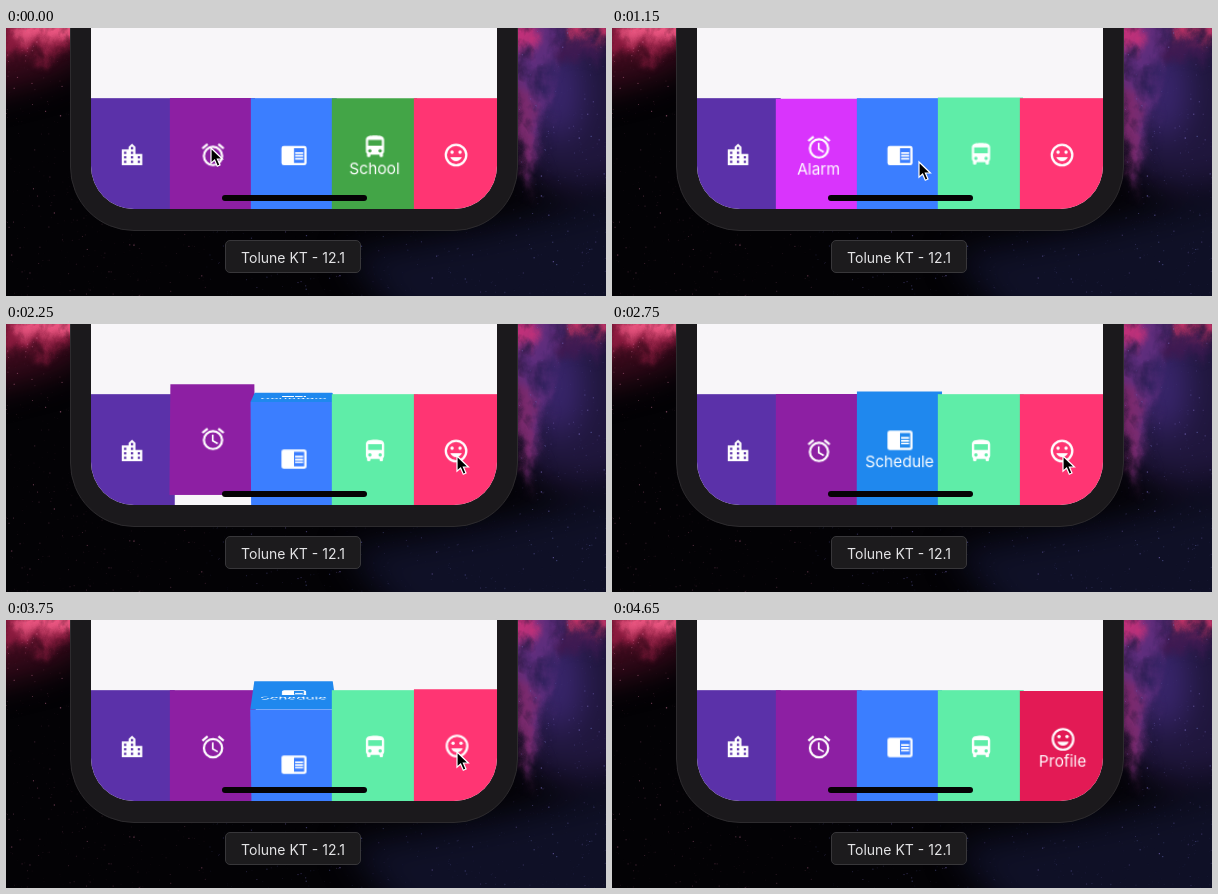
An HTML page with a canvas that plays this animation: 600x268 px, repeating every 4.7 s.

```html
<!DOCTYPE html>
<html lang="en">
<head>
<meta charset="utf-8">
<title>Flip box bar</title>
<style>
  html, body { margin: 0; width: 100%; height: 100%; overflow: hidden; background: #030305; }
  #stage { position: relative; width: 600px; height: 268px; overflow: hidden; font-family: Inter, "Open Sans", sans-serif; }
  #sky, #stars { position: absolute; left: 0; top: 0; }
  #phone {
    position: absolute; left: 64px; top: -200px; width: 446px; height: 401px;
    background: #1b191c; border: 1px solid #2d2b2e; border-radius: 0 0 64px 64px; box-sizing: content-box;
  }
  #screen {
    position: absolute; left: 85px; top: -100px; width: 405.75px; height: 281.2px;
    overflow: hidden; background: #f8f6f9; border-radius: 0 0 43px 43px;
  }
  .item { position: absolute; top: 172.7px; width: 81.15px; height: 108.3px; perspective: 1083px; }
  .cube, .face { position: absolute; inset: 0; }
  .cube { transform-style: preserve-3d; }
  .face { backface-visibility: hidden; color: #fff; }
  .front { transform: translateZ(54.15px); }
  .top { transform: rotateX(90deg) translateZ(54.15px); }
  .face svg { position: absolute; left: 27.6px; top: 41.2px; width: 26px; height: 26px; fill: #fff; }
  .top svg { top: 32.6px; }
  .face span {
    position: absolute; left: -10px; right: -10px; top: 57.4px; line-height: 20px;
    text-align: center; font-size: 14.8px; white-space: nowrap;
  }
  #home { position: absolute; left: 216px; top: 167px; width: 145px; height: 5.5px; border-radius: 3px; background: #050305; }
  #device {
    position: absolute; left: 219px; top: 212px; width: 134px; height: 31px; line-height: 33px;
    border: 1px solid #38373a; border-radius: 5px; background: #1c1b1d;
    color: #e4e4e6; font-size: 14px; text-align: center; white-space: nowrap;
  }
  #cursor { position: absolute; left: -2px; top: -2px; width: 16px; height: 23px; }
</style>
</head>
<body>
<div id="stage">
  <svg id="sky" width="600" height="268">
    <defs>
      <filter id="cloud" filterUnits="userSpaceOnUse" x="-40" y="-40" width="680" height="348" color-interpolation-filters="sRGB">
        <feGaussianBlur stdDeviation="6" result="soft"/>
        <feTurbulence type="fractalNoise" baseFrequency=".04 .03" numOctaves="5" seed="8" result="noise"/>
        <feDisplacementMap in="soft" in2="noise" scale="30" xChannelSelector="R" yChannelSelector="G" result="torn"/>
        <feColorMatrix in="noise" values="0 0 0 0 0  0 0 0 0 0  0 0 0 0 0  0 0 0 2.6 -.45"/>
        <feComposite in="torn" operator="in"/>
      </filter>
      <filter id="haze" filterUnits="userSpaceOnUse" x="-80" y="-80" width="760" height="428" color-interpolation-filters="sRGB">
        <feGaussianBlur stdDeviation="16"/>
      </filter>
    </defs>
    <rect width="600" height="268" fill="#030205"/>
    <g filter="url(#haze)">
      <path d="M-40-40H80V30L40 50-40 70Z" fill="#3a0a1c"/>
      <path d="M500-40H640V150L570 165 520 150Z" fill="#1f163c"/>
      <path d="M340 225 480 200 640 160V300H400Z" fill="#0f1026"/>
      <ellipse cx="552" cy="62" rx="24" ry="50" fill="#3a266e"/>
    </g>
    <g filter="url(#cloud)">
      <path d="M-30-30H75V18L50 28 20 26-30 40Z" fill="#8a1a3e"/>
      <path d="M4-25H68V6L46 16 18 12Z" fill="#ea5580"/>
      <path d="M495-30H556L550 40 540 92 530 165 522 150 505 80Z" fill="#5d2d7c"/>
      <path d="M500 40 522 60 530 110 529 165 521 150 505 90Z" fill="#7c2a6e"/>
      <path d="M495-30H535L528 14 512 34Z" fill="#c23079"/>
      <path d="M548-30H620V12L590 10 565 4Z" fill="#cc3569"/>
      <path d="M545 5 600 14 592 28 552 34Z" fill="#3f1a52"/>
    </g>
  </svg>
  <canvas id="stars" width="600" height="268"></canvas>
  <div id="phone"></div>
  <div id="screen"></div>
  <div id="home"></div>
  <div id="device">Tolune KT - 12.1</div>
  <svg id="cursor" viewBox="-2 -2 16 23">
    <path d="M0 0V15.2L3.6 12 6.3 18.2 9 17 6.4 11H11.4Z" fill="#000" stroke="#fff" stroke-width="1.2"/>
  </svg>
</div>
<script>
const LOOP = 4700, FLIP = 2080, PITCH = 81.15;
const ALARM = -510, SCHEDULE = 1295, PROFILE = 3012;

const holes = (x, ys) => ys.map(y => `M${x} ${y}h2v2h-2z`).join('');
const path = d => `<path fill-rule="evenodd" d="${d}"/>`;
const line = (d, w) => `<path fill="none" stroke="#fff" stroke-width="${w}" d="${d}"/>`;
const ring = (cy, r) => `<circle cx="12" cy="${cy}" r="${r}" fill="none" stroke="#fff" stroke-width="2"/>`;
const dot = (x, y) => `<circle cx="${x}" cy="${y}" r="1.5"/>`;

const icons = {
  city: path('M15 11V5l-3-3-3 3v2H3v14h18V11z' +
    holes(5, [9, 13, 17]) + holes(11, [5, 9, 13, 17]) + holes(17, [13, 17])),
  alarm: ring(13, 8) + line('M2.65 6.5 7.25 2.6M16.75 2.6l4.6 3.9', 2) + line('M11.75 8v5.6l4.4 2.6', 1.5),
  reader: path('M13 12h7v1.5h-7zm0-2.5h7V11h-7zm0 5h7V16h-7zM21 4H3a2 2 0 0 0-2 2v13a2 2 0 0 0 2 2h18a2 2 0 0 0 2-2V6a2 2 0 0 0-2-2zm0 15h-9V6h9z'),
  bus: path('M4 16a3 3 0 0 0 1 2.2V20a1 1 0 0 0 1 1h1a1 1 0 0 0 1-1v-1h8v1a1 1 0 0 0 1 1h1a1 1 0 0 0 1-1v-1.8a3 3 0 0 0 1-2.2V6c0-3.5-3.6-4-8-4s-8 .5-8 4z' +
    'M6 6h12v5H6zM6 15.5a1.5 1.5 0 0 0 3 0 1.5 1.5 0 0 0-3 0zM15 15.5a1.5 1.5 0 0 0 3 0 1.5 1.5 0 0 0-3 0z'),
  smile: ring(12, 9) + dot(8.5, 9.5) + dot(15.5, 9.5) + path('M12 17.5c2.3 0 4.3-1.5 5.1-3.5H6.9c.8 2 2.8 3.5 5.1 3.5z')
};

// on / off: when the box starts turning to its labelled face and back
const items = [
  { icon: 'city', label: 'Home', front: '#5b31a9', top: '#5b31a9', on: Infinity, off: Infinity },
  { icon: 'alarm', label: 'Alarm', front: '#8d1fa3', top: '#d934fc', on: ALARM, off: SCHEDULE },
  { icon: 'reader', label: 'Schedule', front: '#3b7eff', top: '#1f88ee', on: SCHEDULE, off: PROFILE },
  { icon: 'bus', label: 'School', front: '#5feda8', top: '#43a547', on: -LOOP, off: ALARM },
  { icon: 'smile', label: 'Profile', front: '#ff3573', top: '#e31a55', on: PROFILE, off: Infinity }
];

const screen = document.getElementById('screen');
items.forEach((item, i) => {
  const svg = `<svg viewBox="0 0 24 24">${icons[item.icon]}</svg>`;
  const box = document.createElement('div');
  box.className = 'item';
  box.style.left = i * PITCH + 'px';
  box.innerHTML = `<div class="cube">
    <div class="face front" style="background:${item.front}">${svg}</div>
    <div class="face top" style="background:${item.top}">${svg}<span>${item.label}</span></div></div>`;
  screen.append(box);
  item.cube = box.firstChild;
});

// Faint red dust on the left, blue stars on the right
function drawStars() {
  const ctx = document.getElementById('stars').getContext('2d');
  let seed = 11;
  const rnd = () => (seed = (seed * 16807) % 2147483647) / 2147483647;
  for (let i = 0; i < 2200; i++) {
    const x = rnd() * 600, y = rnd() * 268, size = .6 + rnd() * .7;
    const hue = x < 200 ? 335 : 232 + rnd() * 25;
    ctx.fillStyle = `hsla(${hue}, 45%, 62%, ${.05 + .6 * rnd() ** 5})`;
    ctx.fillRect(x, y, size, size);
  }
}

const clamp = x => Math.min(1, Math.max(0, x));

function elasticInOut(x) {
  if (x <= 0 || x >= 1) return clamp(x);
  const u = 2 * x - 1;
  const wave = .5 * 2 ** (-10 * Math.abs(u)) * Math.sin((u - .1) * 5 * Math.PI);
  return u < 0 ? -wave : 1 + wave;
}

// A box turned back early starts from where it had got to
function progress({ on, off }, t) {
  const p = clamp((Math.min(t, off) - on) / FLIP);
  return t > off ? clamp(p - (t - off) / FLIP) : p;
}

// time, x, y
const track = [
  [0, 205, 120], [200, 205, 120], [650, 323, 149], [750, 323, 149], [1100, 307, 134],
  [1400, 307, 134], [1950, 451, 132], [3780, 451, 132], [4060, 500, 275]
];

function cursorAt(t) {
  const i = track.findIndex(p => p[0] > t);
  if (i < 0) return track[track.length - 1].slice(1);
  const [t0, x0, y0] = track[i - 1], [t1, x1, y1] = track[i];
  const u = (t - t0) / (t1 - t0), k = u * u * (3 - 2 * u);
  return [x0 + (x1 - x0) * k, y0 + (y1 - y0) * k];
}

const cursor = document.getElementById('cursor');

function render() {
  const t = performance.now() % LOOP;
  for (const item of items) {
    item.cube.style.transform = `rotateX(${-90 * elasticInOut(progress(item, t))}deg)`;
  }
  const [x, y] = cursorAt(t);
  cursor.style.transform = `translate(${x}px, ${y}px)`;
  requestAnimationFrame(render);
}

drawStars();
render();
</script>
</body>
</html>
```
